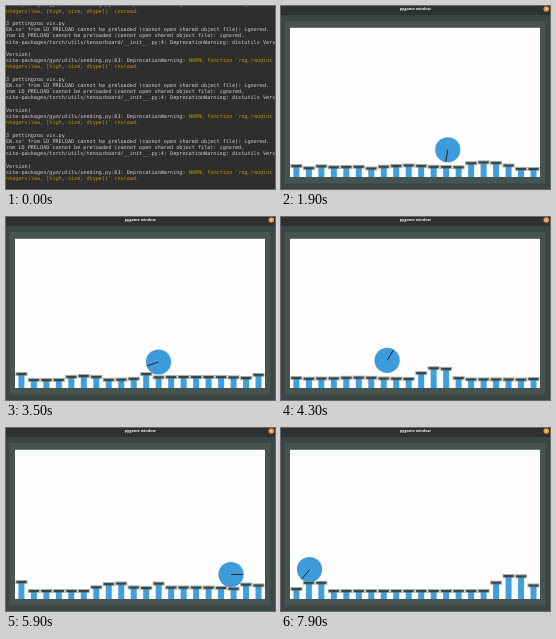
Animation of 269x183 px, one loop 8000 ms. Source, as an HTML page with a canvas:

```html
<!DOCTYPE html>
<html>
<head>
<meta charset="utf-8">
<style>
  html, body { margin: 0; width: 100%; height: 100%; overflow: hidden; background: #2d2e2e; }
  canvas { display: block; }
</style>
</head>
<body>
<canvas id="stage" width="269" height="183"></canvas>
<script>
const g = document.getElementById('stage').getContext('2d');

// Ticks (100 ms) at which the picture stands still
const held = new Set([16, 18, 22, 26, 28, 30, 33, 34, 36, 41, 42, 44, 46, 49, 52, 54, 56, 60, 68, 76]);

// Every pair is [first, last]; the piston line is a sum of bumps [index, height, width]
const rounds = [
  {
    begins: 13, ticks: [13, 25], ease: 1, x: [246, 87.5], y: [147, 148.5], angle: [138, -659],
    bumps: [
      [[8, 6.5, 7], [14, 5, 0.6], [6, -5, 0.6], [2, 4, 0.6], [17, 5, 0.6]],
      [[15.4, 9, 1.5], [0, 4, 0.7], [9, 2, 1.2]]
    ]
  },
  {
    begins: 35, ticks: [35, 48], ease: 2, x: [152.5, 30], y: [145, 148.5], angle: [161, -419],
    bumps: [
      [[0, 6, 0.6], [5, 4, 1.4], [10, 4, 0.7], [14, 3, 5], [19, 4, 0.6]],
      [[11.3, 14, 1.4], [4.5, 2, 5]]
    ]
  },
  {
    begins: 57, ticks: [59, 79], ease: 1.8, x: [225, 28.5], y: [146.5, 141.5], angle: [0, -952],
    bumps: [
      [[0, 9, 0.6], [7.3, 6.5, 1.5], [11, 4, 0.6], [13, 3.5, 5], [18.5, 6, 0.8]],
      [[17.4, 15, 1.6], [1.5, 9, 0.9], [0, 2, 0.7]]
    ]
  }
];

const clamp = u => Math.max(0, Math.min(1, u));
const mix = ([a, b], u) => a + (b - a) * u;
const lift = (bumps, i) =>
  bumps.reduce((sum, [c, h, w]) => sum + h * Math.exp(-(((i - c) / w) ** 4)), 0);

function rect(color, x, y, w, h) {
  g.fillStyle = color;
  g.fillRect(x, y, w, h);
}

function disc(color, x, y, r) {
  g.fillStyle = color;
  g.beginPath();
  g.arc(x, y, r, 0, 2 * Math.PI);
  g.fill();
}

function say(color, text, x, y) {
  g.fillStyle = color;
  g.fillText(text, x, y);
}

function terminal() {
  const white = '#cfd0ca', yellow = '#b89608', pitch = 6.2, advance = 3.1;
  const preload = 'rom LD_PRELOAD cannot be preloaded (cannot open shared object file): ignored.';
  const seeding = 'site-packages/gym/utils/seeding.py:63: DeprecationWarning: ';
  const lines = [
    '3 pettingzoo_vis.py',
    "EW.so' f" + preload,
    preload,
    'site-packages/torch/utils/tensorboard/__init__.py:4: DeprecationWarning: distutils Vers',
    '',
    'Version(',
    seeding
  ];
  rect('#2d2e2e', 0, 0, 269, 183);
  g.font = '5.15px "DejaVu Sans Mono", monospace';
  g.textAlign = 'left';
  g.textBaseline = 'middle';
  for (let block = -1; block < 3; block++) {
    const top = 17.6 + block * 9 * pitch;
    lines.forEach((line, i) => say(white, line, 0, top + i * pitch));
    say(yellow, 'WARN: Function `rng.randint', seeding.length * advance, top + 6 * pitch);
    say(yellow, 'ntegers(low, [high, size, dtype])` instead.', 0, top + 7 * pitch);
  }
}

function piston(x, top) {
  rect('#419fdd', x - 3, top, 6, 171 - top);
  rect('rgba(85,98,90,.5)', x - 6, top - 2, 12, 4);
  rect('#3b4442', x - 5, top - 1, 10, 2);
}

function ball(x, y, degrees) {
  const a = degrees * Math.PI / 180;
  disc('#3d9bdc', x, y, 12.6);
  g.strokeStyle = '#20262c';
  g.lineWidth = 1;
  g.beginPath();
  g.moveTo(x, y);
  g.lineTo(x + 12 * Math.cos(a), y + 12 * Math.sin(a));
  g.stroke();
}

function titleBar(grow) {
  rect('#2f3130', 0, 0, 269, 9 + 2 * grow);
  g.font = 'bold 3.85px "Open Sans", sans-serif';
  g.textAlign = 'center';
  g.textBaseline = 'middle';
  say('#f0f0ee', 'pygame window', 134.3, 3.2 + grow);
  disc('#ea9247', 265.3, 3 + grow, 2.8);
  disc('#f6d3ae', 265.3, 3 + grow, 1);
}

function gameWindow(tick) {
  // The window still grows to full size during its first two ticks
  const grow = clamp((15 - tick) / 2);
  g.save();
  g.translate(9 + grow, 21 + 2 * grow);
  g.scale(1 - 0.009 * grow, 1 - 0.013 * grow);
  g.translate(-9, -21);

  rect('#3a4645', -10, -10, 300, 210);
  rect('#46534f', 3.5, 15, 261, 162.5);
  rect('#fdfdfd', 9, 21.8, 250, 149.2);

  const { ticks, ease, x, y, angle, bumps } = rounds.findLast(r => tick >= r.begins);
  const u = Math.max(0, (tick - ticks[0]) / (ticks[1] - ticks[0]));
  const settle = clamp(u * 1.3);
  for (let i = 0; i < 20; i++) {
    piston(15.4 + 12.48 * i, 163 - mix(bumps.map(b => lift(b, i)), settle));
  }

  // The ball rolls left until the wall stops it
  const wall = (22 - x[0]) / (x[1] - x[0]);
  const rolled = Math.min(u ** ease, wall);
  const v = clamp(u);
  ball(mix(x, rolled), mix(y, v) - 4 * Math.sin(Math.PI * v), mix(angle, rolled));
  g.restore();
  titleBar(grow);
}

const begin = performance.now();

function draw() {
  let tick = Math.floor((performance.now() - begin) % 8000 / 100);
  while (held.has(tick)) tick--;
  if (tick < 13) terminal();
  else gameWindow(tick);
  requestAnimationFrame(draw);
}
draw();
</script>
</body>
</html>
```
